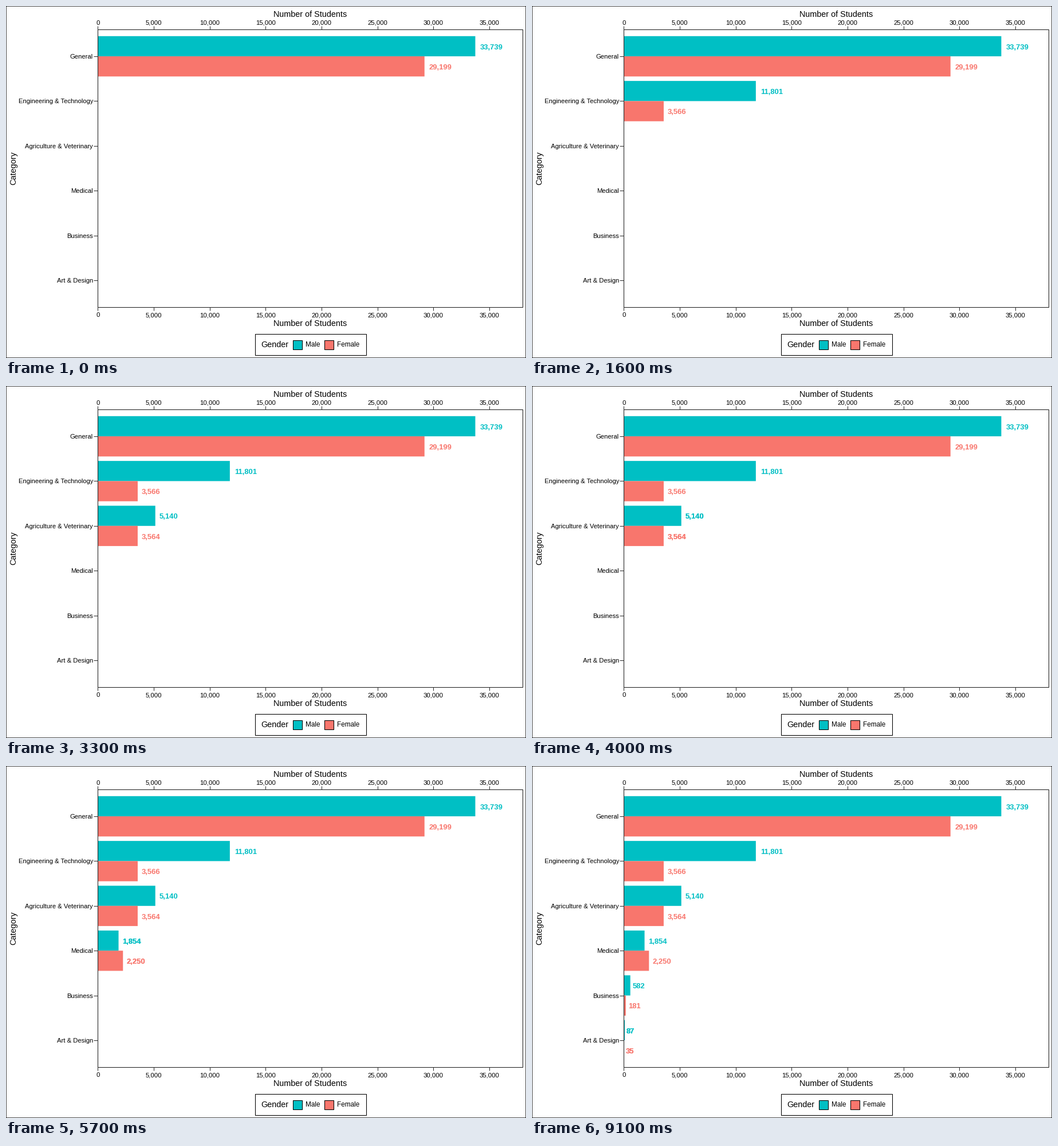
A matplotlib script that plays this animation: 908x616 px, repeating every 10 s.

```python
import matplotlib.pyplot as plt
from matplotlib.animation import FuncAnimation
from matplotlib.patches import Rectangle

W, H, DPI = 908, 616, 100
INTERVAL, FRAMES = 100, 100
STAGE_FRAMES, SETTLE_FRAMES = 17, 7

MALE, FEMALE = "#00BFC4", "#F8766D"
LEFT, TOP, RIGHT, BOTTOM = 160.3, 41, 902.3, 527
PX_PER_STUDENT = (844 - 160.2) / 35000
ROW = (BOTTOM - TOP) / 6.2
BAR = 0.45 * ROW

DATA = [
    ("General", 33739, 29199),
    ("Engineering & Technology", 11801, 3566),
    ("Agriculture & Veterinary", 5140, 3564),
    ("Medical", 1854, 2250),
    ("Business", 582, 181),
    ("Art & Design", 87, 35),
]

plt.rcParams["font.family"] = "Liberation Sans"

fig = plt.figure(figsize=(W / DPI, H / DPI), dpi=DPI, facecolor="white")
ax = fig.add_axes([0, 0, 1, 1])
ax.set_xlim(0, W)
ax.set_ylim(H, 0)
ax.axis("off")


def points(px):
    return px * 72 / DPI


def text(x, y, s, px, ha="left", **kw):
    return ax.text(x, y, s, fontsize=points(px), ha=ha,
                   **{"va": "baseline", "color": "black", **kw})


def box(x0, y0, x1, y1, fill="none", edge="none", width=1.07, **kw):
    return ax.add_patch(Rectangle((x0, y0), x1 - x0, y1 - y0, facecolor=fill,
                                  edgecolor=edge, linewidth=points(width), **kw))


def tick(xs, ys):
    ax.plot(xs, ys, color="#333333", lw=points(1.07), solid_capstyle="butt", zorder=3)


def bar_with_label(value, y, color):
    end = LEFT + value * PX_PER_STUDENT
    bar = box(LEFT, y, end, y + BAR, color, zorder=1, snap=False)
    label = f"{value:,}"
    advance = 13 * sum(0.278 if c == "," else 0.556 for c in label)
    style = dict(color=color, weight="bold", zorder=4)
    x, base = end + 0.2 * advance, y + BAR / 2 + 5.2
    normal, heavy = (text(x, base, label, 13, **style) for _ in range(2))
    return bar, normal, heavy


def draw_axes():
    box(0, 0, W, H, edge="black", width=1.4, snap=False)
    box(LEFT, TOP, RIGHT, BOTTOM, edge="#222222", zorder=3)
    for value in range(0, 35001, 5000):
        x = LEFT + value * PX_PER_STUDENT
        tick([x, x], [TOP - 6, TOP])
        tick([x, x], [BOTTOM, BOTTOM + 6])
        for y in (33, 544):
            text(x, y, f"{value:,}", 11.4, "center")
    for y in (19, 560):
        text((LEFT + RIGHT) / 2, y, "Number of Students", 14.4, "center")
    text(17, (TOP + BOTTOM) / 2, "Category", 14.4, "right", va="center", rotation=90,
         rotation_mode="default").set_x(20)


def draw_legend():
    box(434.5, 573.5, 628.5, 610.5, edge="black")
    text(445.5, 597, "Gender", 14.4)
    for x, name, color in ((500.5, "Male", MALE), (555.5, "Female", FEMALE)):
        box(x, 584.5, x + 16, 600.5, color, "black")
        text(x + 22.5, 596, name, 11.7)


draw_axes()
draw_legend()

groups = []
for i, (name, male, female) in enumerate(DATA):
    center = TOP + (0.6 + i) * ROW
    tick([LEFT - 7, LEFT], [center, center])
    text(152, center + 4, name, 11.3, "right")
    groups.append([bar_with_label(male, center - BAR, MALE),
                   bar_with_label(female, center, FEMALE)])


def update(frame):
    """Each stage adds a category; its labels are overprinted once settled."""
    stage, phase = divmod(frame + 1, STAGE_FRAMES)
    for i, group in enumerate(groups):
        for bar, normal, heavy in group:
            bar.set_visible(i <= stage)
            normal.set_visible(i <= stage)
            heavy.set_visible(i == stage and phase >= SETTLE_FRAMES)
    return []


anim = FuncAnimation(fig, update, frames=FRAMES, interval=INTERVAL,
                     repeat=True, repeat_delay=0, blit=False)
plt.show()
```
